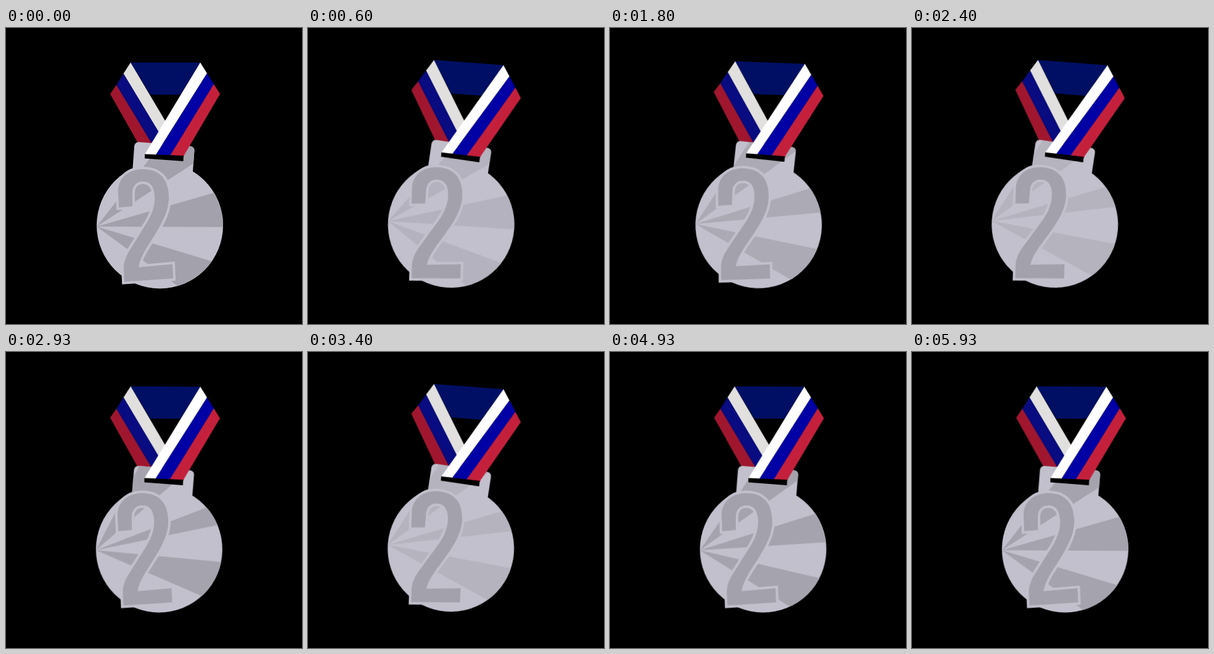
These frames come from a looping animation (480x480 px, 5.99 s). An HTML page:

```html
<!DOCTYPE html>
<html lang="en">
<head>
<meta charset="utf-8">
<title>Swinging silver medal</title>
<style>
  html, body { margin: 0; width: 100%; height: 100%; overflow: hidden; background: #000; }
  svg { display: block; width: 100vw; height: 100vh; }

  .swing { transform-origin: 258px 85px; animation: swing 1s infinite paused; }
  .shine { animation: shine 1s infinite paused; }
  .fan { animation: fan 6s infinite paused; }

  @keyframes swing {
    0% { transform: rotate(0deg); animation-timing-function: cubic-bezier(.3, .05, .33, 1); }
    50% { transform: rotate(4.5deg); animation-timing-function: cubic-bezier(.5, 0, .7, 1); }
    100% { transform: rotate(0deg); }
  }
  @keyframes shine {
    0% { opacity: .97; animation-timing-function: cubic-bezier(.3, .05, .33, 1); }
    50% { opacity: .4; animation-timing-function: cubic-bezier(.5, 0, .7, 1); }
    100% { opacity: .97; }
  }
  /* Three rays fanning out from the left rim */
  @keyframes fan {
    0%, 100% {
      d: path("M147 322L307 117L365 180ZM147 322L397 250L407 323ZM147 322L396 397L357 476Z");
      animation-timing-function: cubic-bezier(.5, 0, .6, 1);
    }
    50% {
      d: path("M147 322L265 90L343 151ZM147 322L389 227L401 268ZM147 322L406 345L386 424Z");
      animation-timing-function: cubic-bezier(.3, .2, .7, .8);
    }
  }
</style>
</head>
<body>
<svg viewBox="0 0 480 480">
  <defs>
    <circle id="disc" cx="249.5" cy="320" r="102.5"/>
    <path id="tab" d="M204.500 240L208 192Q209 184.500 216 185L298 191.500Q306 192.500 305.500 199L302 245Z"/>
    <clipPath id="body">
      <use href="#disc"/>
      <use href="#tab"/>
    </clipPath>
  </defs>
  <g class="swing">
    <!-- ribbon behind the medal -->
    <path fill="#000f64" d="M202 56H315L283 108H234Z"/>
    <path fill="#e1e0df" d="M202 56L259 152L249 171L190.500 74Z"/>
    <path fill="#090b80" d="M190.500 74L249 171L238 190L179 92.500Z"/>
    <path fill="#a0162f" d="M179 92.500L238 190H216L169 107Z"/>

    <g fill="#c2c0cc">
      <use href="#disc"/>
      <use href="#tab"/>
    </g>
    <g clip-path="url(#body)">
      <g class="shine">
        <path class="fan" fill="#a3a1ab" d="M147 322L307 117L365 180ZM147 322L397 250L407 323ZM147 322L396 397L357 476Z"/>
      </g>
    </g>

    <!-- ribbon in front, ending in the slot -->
    <path fill="#fff" d="M315 56L326 73.500L242 207H225V205Z"/>
    <path fill="#0000a4" d="M326 73.500L337 91L266 208H241.500Z"/>
    <path fill="#c4203c" d="M337 91L347 107L289 206V208H265.500Z"/>
    <path d="M225 204.500L288 207L287.500 216L225 211.500Z"/>

    <path fill="#a3a1ab" stroke="#c2c0cc" stroke-width="8" paint-order="stroke"
      d="M183 291L182 268C180 245 197 230 220 229C247 228 263 243 264 272C265 294 255 313 241 336C229 355 217 372 215 388L270 383L271 406L192 411.500L191 390C191 378 195 369 202 358L230 313C238 299 242 286 241 272C240 256 233 249 222 249C211 249 204 257 205 270V289Z"/>
  </g>
</svg>
<script>
  const LOOP = 5990, FPS = 15, FRAMES = 90;
  const parts = document.getAnimations();
  const start = performance.now();

  // Step the paused CSS animations at the film's frame rate.
  function tick() {
    const time = (performance.now() - start) % LOOP;
    const step = Math.min(FRAMES - 1, Math.floor((time + 4) * FPS / 1000));
    for (const part of parts) part.currentTime = step * 1000 / FPS;
    requestAnimationFrame(tick);
  }
  tick();
</script>
</body>
</html>
```
